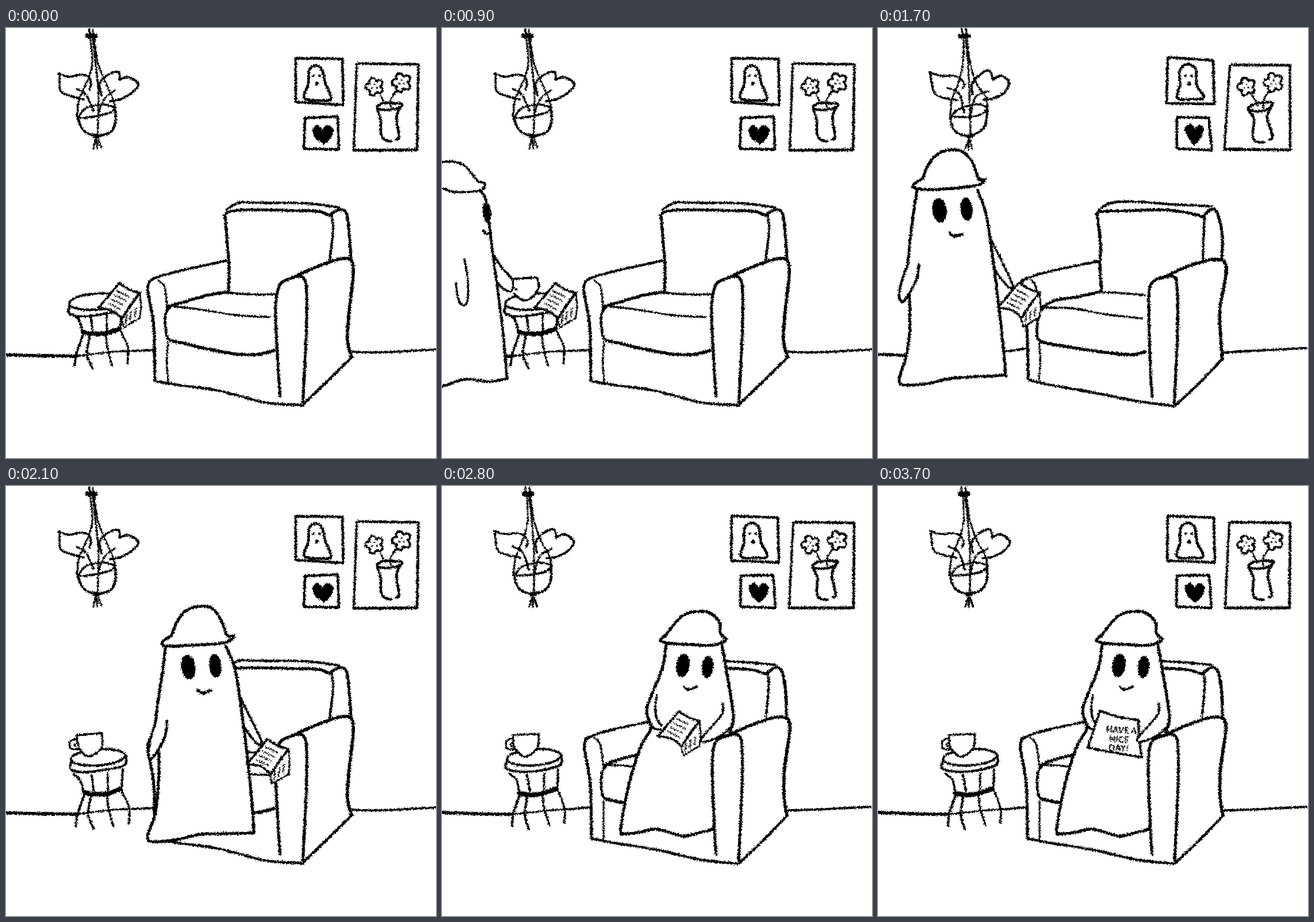
Animation, 748 px wide and 748 px high, one loop 3.8 s. Source, as an HTML page:

```html
<!DOCTYPE html>
<html lang="en">
<head>
<meta charset="utf-8">
<title>Ghost at home</title>
<style>
html, body { margin: 0; width: 100%; height: 100%; overflow: hidden; background: #fff; }
svg { display: block; width: 100vw; height: 100vh; }
path { stroke: #000; stroke-linecap: round; stroke-linejoin: round; }
text { font: 700 15px Lato, "Open Sans", sans-serif; text-anchor: middle; }
</style>
</head>
<body>
<svg viewBox="0 0 748 748">
  <filter id="chalk" filterUnits="userSpaceOnUse" x="-10" y="-10" width="768" height="768" color-interpolation-filters="sRGB">
    <feTurbulence id="grain" type="fractalNoise" baseFrequency=".4" numOctaves="2" seed="1"/>
    <feDisplacementMap in="SourceGraphic" scale="6" xChannelSelector="R" yChannelSelector="G"/>
  </filter>
  <g id="stage" filter="url(#chalk)"></g>
</svg>
<script>
const WHITE = "#fff", BLACK = "#000";
let take = 0;   // which of the three redrawn takes is showing
let shake = 0;  // how far the current sketch strays from its clean take

const path = (d, width, fill = "none") => `<path d="${d}" stroke-width="${width}" fill="${fill}"/>`;
const move = (x, y, s) => `<g transform="translate(${x} ${y})">${s}</g>`;

function wobble([x, y]) {
  return [x + 1.3 * Math.sin(shake * (x * .13 + y * .07)), y + 1.3 * Math.sin(shake * (y * .11 - x * .05))];
}

const points = s => s.split(" ").map(p => wobble(p.split(",").map(Number)));
const same = (a, b) => a[0] === b[0] && a[1] === b[1];

// Smooth line through the points; a doubled point is a corner.
function curve(p) {
  let d = "M" + p[0];
  for (let i = 0; i < p.length - 1; i++) {
    const b = p[i], c = p[i + 1], a = p[i - 1] || b, e = p[i + 2] || c;
    if (same(b, c)) continue;
    const h = k => [b[k] + (c[k] - a[k]) / 6, c[k] - (e[k] - b[k]) / 6];
    const [x1, x2] = h(0), [y1, y2] = h(1);
    d += `C${x1} ${y1} ${x2} ${y2} ${c}`;
  }
  return d;
}

const ink = (width, s, fill) => path(curve(points(s)), width, fill);
const poly = (width, s, fill) => path("M" + points(s).join("L"), width, fill);
const box = (width, s, fill) => path("M" + points(s).join("L") + "Z", width, fill);

function oval(x, y, rx, ry, turn = 0, width = 1, fill = BLACK) {
  return `<g transform="rotate(${turn} ${x} ${y})">` +
    path(`M${x - rx} ${y}a${rx} ${ry} 0 1 1 ${2 * rx} 0a${rx} ${ry} 0 1 1 ${-2 * rx} 0`, width, fill) + "</g>";
}

function flower(x, y, r) {
  const pts = [];
  for (let i = 0; i <= 40; i++) {
    const a = i * Math.PI / 20 + shake * .3, q = r * (.62 + .38 * Math.abs(Math.sin(2.5 * a)));
    pts.push([x + q * Math.cos(a), y + q * Math.sin(a)]);
  }
  const dots = [0, 1, 2].map(i => `M${x - 4 + i * 4} ${y + (i % 2 ? -4 : 2)}h.1`).join("");
  return path(curve(pts), 3.8) + path(dots, 3);
}

function scribble(x, y, dx, dy) {
  const len = Math.hypot(dx, dy), n = Math.round(len / 2.5), pts = [];
  for (let i = 0; i <= n; i++) {
    const u = i / n, v = (i % 2 ? 1.3 : -1.3) / len;
    pts.push([x + dx * u - dy * v, y + dy * u + dx * v]);
  }
  return path(curve(pts), 1.5);
}

const scribbles = (n, x, y, stepX, stepY, dx, dy) =>
  Array.from({ length: n }, (_, i) => scribble(x + i * stepX, y + i * stepY, dx, dy)).join("");

const floor = () =>
  ink(5.5, "0,568 60,570 122,571") +
  ink(3, "122,571 190,564 225,562") +
  ink(4, "225,562 256,559") +
  ink(4, "602,564 650,563 746,558");

const plant = () =>
  ink(3, "145,1 147,12") + ink(3, "152,2 153,12") + ink(9, "143,14 156,14") +
  ink(3, "148,20 149,60 142,90 128,125 125,150") +
  ink(3, "154,20 160,60 172,95 188,125 190,155") +
  ink(3, "152,20 157,70 160,120 160,185") +
  ink(4, "124,150 130,172 142,184 160,187 180,180 189,165 190,135") +
  ink(3.5, "128,153 140,140 170,133 188,138 185,146 165,153 130,156") +
  ink(3.5, "90,78 110,84 130,82 143,86 149,98 146,106") +
  ink(3.5, "92,80 96,110 110,119 136,125") +
  ink(3.5, "122,105 140,115 151,145") +
  ink(4, "165,116 163,98 175,83 194,75 199,90 199,90 213,84 229,96 220,112 200,123 182,126") +
  ink(3, "191,109 170,122 161,152") +
  ink(7, "156,188 162,188") + ink(3.5, "158,190 158,210") +
  ink(3, "156,195 152,210") + ink(3, "161,195 165,210");

const ghostPicture = () =>
  box(4.5, "504,52 584,55 586,133 503,130") +
  ink(4.5, "526,98 526,74 538,64 551,72 555,98 566,122 545,125 520,122 526,98") +
  oval(535, 83, 2, 2) + oval(546, 83, 2, 2) + oval(541, 97, 3, 3.5);

const heartPicture = () =>
  box(4.5, "520,156 576,155 580,212 519,210") +
  ink(1, "551,203 551,203 539,191 534,176 543,168 551,177 551,177 558,169 568,176 562,193 551,203", BLACK);

const vasePicture = () =>
  poly(4.5, "614,63 717,64 716,208") + poly(5, "716,212 604,212") + poly(4, "604,208 611,64") +
  ink(4.5, "644,138 657,131 687,131 680,140 660,144 645,141") +
  ink(4.5, "645,142 653,160 652,185 658,196 671,198") +
  ink(4.5, "686,136 678,155 685,188 680,194") +
  ink(2.5, "650,114 660,134") + ink(3, "681,108 670,125 670,139") +
  flower(641, 102, 16) + flower(688, 95, 17);

const chairBack = () =>
  ink(4, "384,316 405,304 440,303 520,306 580,311") +
  ink(5, "380,325 390,319 430,317 500,317 540,320 564,327") +
  ink(5, "381,325 386,375 387,415 388,460") +
  ink(4, "567,325 568,350 564,402") +
  ink(5, "564,327 579,316 591,322 598,360 599,401");

const chairSeat = () =>
  ink(4.5, "250,441 262,434 300,423 384,405") +
  ink(5, "250,440 248,458 258,520 260,612") +
  ink(3, "265,438 275,450 281,488") +
  ink(3, "281,547 281,580 281,614") +
  ink(5, "284,485 310,475 350,466 386,459") +
  ink(3.5, "386,460 420,462 466,464") +
  ink(3.5, "290,485 340,489 400,499 459,504") +
  ink(4.5, "287,485 278,500 278,535 286,545") +
  ink(5.5, "286,545 310,550 350,558 400,566 440,568 465,562") +
  ink(4.5, "260,613 300,621 370,632 450,650 515,657");

const chairArm = () =>
  ink(0, "476,641 469,480 485,438 520,425 585,402 606,425 595,500 600,574 600,574 516,656", WHITE) +
  ink(5, "477,641 474,600 470,490 474,450 485,438 498,434") +
  ink(5.5, "498,434 540,415 585,402 605,415 596,490 595,540 600,574") +
  ink(5, "486,438 511,432 521,447 522,520 516,652") +
  ink(4.5, "518,655 560,615 601,573");

const tableTop = () =>
  oval(160, 472, 47, 14, -4, 4, "none") +
  ink(4, "113,478 111,491 135,497 170,495 205,485 208,468");

const tableLegs = () =>
  ink(4, "117,500 130,512 134,535") + ink(4, "148,503 153,530") +
  ink(3.5, "178,500 177,533") + ink(4, "202,493 201,522") +
  ink(8, "135,534 150,537 175,535 199,526") +
  ink(4, "135,538 124,570 122,592") + ink(4, "149,538 144,570 151,597") +
  ink(3.5, "175,540 178,562 187,590") + ink(3.5, "202,530 213,560 213,587");

const restingCup = () =>
  ink(3.5, "123,439 113,443 113,457 125,458", WHITE) + ink(2.5, "125,446 119,449 121,453") +
  ink(3.5, "168,431 166,455 145,471 126,455 124,433 124,433 168,431", WHITE);

const note = () =>
  box(3, "233,461 235,485 233,504 205,521 201,506", WHITE) +
  ink(4, "197,444 197,444 215,455 233,461 233,461 218,480 202,505 202,505 185,492 161,487 161,487 197,444", WHITE) +
  scribbles(4, 193, 457, -5.3, 7.3, 21, 10) + scribbles(3, 210, 499, 8, -6, -2, 15);

const hangingNote = () =>
  ink(3, "492,468 502,490 510,523 510,523 548,520 548,520 551,494", WHITE) +
  box(3, "492,468 515,460 537,452 550,470 555,488 512,500", WHITE) +
  scribbles(4, 503, 469, 9, -3, 14, 23) + scribbles(2, 514, 508, 0, 8, 31, -4);

const entering = () =>
  ink(4.5, "24,275 35,300 42,350 60,490 87,600 80,612 40,608 0,617 -60,625 -60,275", WHITE) +
  ink(4, "-60,225 0,225 12,236 20,251 34,262 28,270 0,274 -60,274", WHITE) +
  oval(33, 323, 7, 17) + ink(3, "29,369 35,373 43,371") +
  ink(4, "7,392 12,430 20,465 17,484 8,484 0,470");

const pouringArm = () =>
  ink(4, "88,393 105,418 124,440 120,458 105,452 92,437", WHITE) +
  ink(4, "124,438 128,436 165,434 165,434 168,452 155,470 140,473 125,462", WHITE) +
  ink(3, "124,440 124,450 130,455");

const sideways = () =>
  ink(4.5, "67,284 77,303 88,390 105,520 113,610 113,610 80,615 40,611 0,623 -60,630 -60,284", WHITE) +
  ink(4, "-60,233 0,233 18,232 40,240 62,266 74,270 72,280 58,284 20,285 0,279 -60,270", WHITE) +
  oval(78, 321, 7, 17, -5) + ink(4, "72,352 77,358 84,357") +
  ink(3.5, "39,402 45,440 44,475 36,482 28,470 24,443");

const standing = () =>
  ink(4, "193,360 210,395 234,446 226,450 202,420", WHITE) +
  ink(5, "68,282 62,320 52,410 55,475 55,530 48,575 37,610 45,621 90,618 130,609 213,604 221,595 212,500 197,380 187,320 173,282", WHITE) +
  ink(4.5, "52,410 40,445 37,468 45,475 66,440 71,412", WHITE) +
  ink(5, "78,262 86,240 103,220 125,212 148,216 165,235 175,262 186,264 170,274 100,281 66,279 62,272 78,262", WHITE) +
  oval(107, 317, 12, 21, -8) + oval(154, 315, 10, 20, -6) + ink(5, "125,357 132,362 147,359");

const seatedHead = () =>
  ink(5, "388,262 400,245 420,225 445,218 468,222 483,238 484,256 494,268 470,277 430,276 392,273 380,268 388,260", WHITE) +
  oval(419, 312, 11, 20, 8) + oval(462, 315, 9.5, 19, 6) + ink(4.5, "420,349 430,354 443,349");

const HEM = "311,596 316,605 345,602 375,597 418,609 440,605 472,597 472,597";

const seated = () =>
  ink(4, "381,345 365,380 343,410 340,432 350,440", WHITE) +
  ink(5, `390,275 383,315 372,395 340,465 325,520 ${HEM} 515,440 515,440 500,390 495,300 487,277`, WHITE) +
  seatedHead();

const loweredArm = () => ink(5, "466,388 475,410 492,464 505,470 516,460 518,442", WHITE);

const reading = () =>
  ink(5, `390,275 383,318 361,372 356,395 363,422 345,455 325,520 ${HEM} 502,425 502,425 507,400 498,340 487,277`, WHITE) +
  ink(4, "361,412 368,421 380,424") + ink(4, "374,364 371,385 374,405 382,416") +
  seatedHead();

const readingArm = () => ink(4, "488,378 488,395 475,412 452,438 456,445 480,437 502,420 507,402", WHITE);

const line = (s, x, y) => `<text x="${x}" y="${y}" transform="rotate(3 ${x} ${y})">${s}</text>`;

const card = () =>
  ink(4, "386,391 386,391 420,402 453,407 453,407 454,438 459,472 459,472 400,462 365,455 365,455 375,425 386,391", WHITE) +
  line("HAVE A", 423, 430) + line("NICE", 419, 446) + line("DAY!", 418, 461);

// Draws parts that look cleanest in the given take.
function sketch(home, ...parts) {
  shake = take - home;
  return parts.map(part => part()).join("");
}

function table(bare) {
  if (bare) return sketch(1, tableTop, tableLegs, restingCup);
  return move(-3, 4, sketch(1, tableTop)) + move(-2, -4, sketch(1, tableLegs)) + sketch(0, note);
}

const walking = (x, y) => move(x, y, sketch(2, standing) + move(48, -1, sketch(2, note)));

function ghost(step) {
  switch (step) {
    case 0: return "";
    case 1: return sketch(1, entering);
    case 2: return move(-18, 0, move(0, -14, sketch(0, pouringArm)) + sketch(0, sideways));
    case 3: return sketch(0, pouringArm, sideways);
    case 4: return walking(-48, 0);
    case 5: return walking(0, 0);
    case 6: return walking(105, 0);
    case 7: return walking(210, -2);
    case 8: return sketch(1, seated);
    default: return sketch(1, reading);
  }
}

function lap(step) {
  if (step === 8) return sketch(1, loweredArm, hangingNote);
  if (step === 9) return move(215, -52, sketch(1, note)) + sketch(1, readingArm);
  return sketch(1, card, readingArm);
}

function scene(frame) {
  const step = Math.min(Math.floor(frame / 3), 10);
  take = frame % 3;
  const room = sketch(1, floor, plant, ghostPicture, heartPicture, vasePicture, chairBack, chairSeat);
  const arm = sketch(1, chairArm), person = ghost(step);
  return room + table(step > 3) + (step < 8 ? arm + person : person + arm + lap(step));
}

const stage = document.getElementById("stage"), grain = document.getElementById("grain");
const start = performance.now();
let shown = -1;

function tick() {
  const frame = Math.floor((performance.now() - start) % 3800 / 100);
  if (frame !== shown) {
    shown = frame;
    grain.setAttribute("seed", 1 + frame % 3);
    stage.innerHTML = scene(frame);
  }
  requestAnimationFrame(tick);
}
tick();
</script>
</body>
</html>
```
